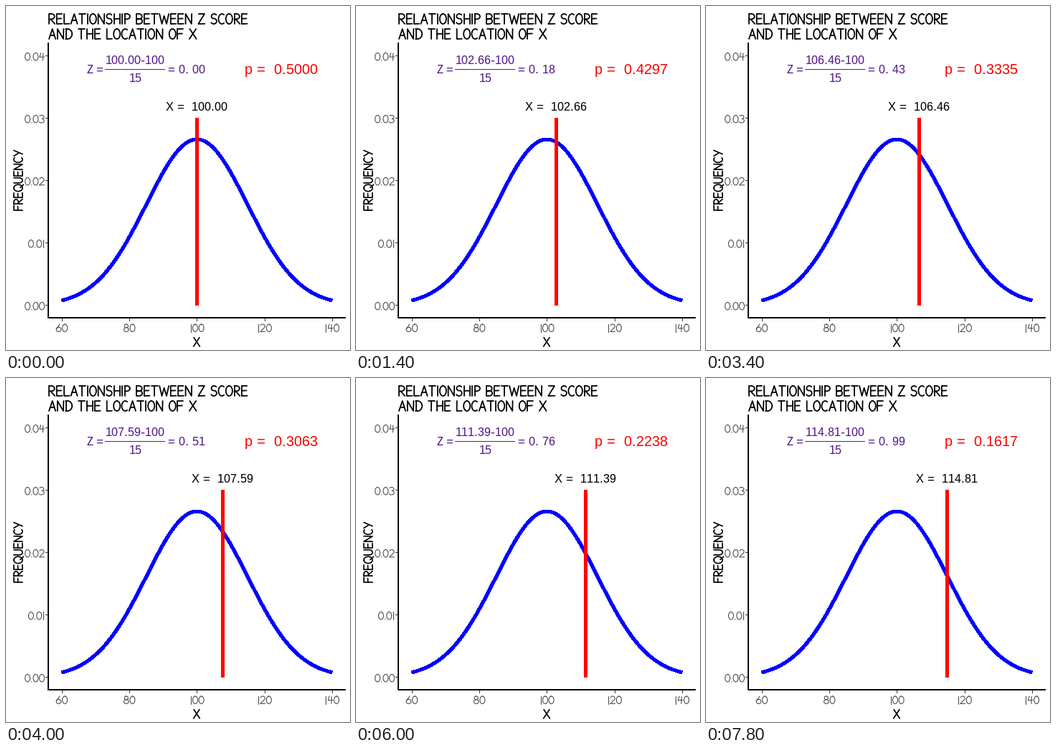
These frames come from a looping animation (480 by 480 pixels, 8000 ms). A matplotlib script:

```python
import math

import matplotlib.pyplot as plt
import numpy as np
from matplotlib.animation import FuncAnimation

SIZE, DPI = 480, 80
PT = 72 / DPI  # points per pixel
FRAMES, INTERVAL = 40, 200
MEAN, SD, STEP = 100, 15, 30 / 79

plt.rcParams.update({
    "font.family": "Liberation Sans",
    "text.hinting": "native",
    "text.hinting_factor": 1,
    "text.kerning_factor": 6,
})

fig = plt.figure(figsize=(SIZE / DPI, SIZE / DPI), dpi=DPI, facecolor="white")
ax = fig.add_axes([0, 0, 1, 1])
ax.set_xlim(0, SIZE)
ax.set_ylim(SIZE, 0)
ax.axis("off")


def px(x):
    return 266.4 + 4.714 * (x - MEAN)


def py(y):
    return 417.45 - 8700 * y


# Hand-lettered alphabet: strokes in a unit box, y pointing up.
def line(*xy):
    return np.array(xy, float).reshape(-1, 2)


def arc(cx, cy, rx, ry, start=90, end=450):
    t = np.radians(np.linspace(start, end, 30))
    return np.column_stack([cx + rx * np.cos(t), cy + ry * np.sin(t)])


def join(*parts):
    return np.vstack(parts)


STEM = line(0.05, 0, 0.05, 1)
RING = arc(0.5, 0.5, 0.5, 0.5)
BOWL = join(line(0.05, 1), arc(0.4, 0.74, 0.55, 0.26, 90, -90), line(0.05, 0.45))

LETTERS = {
    "A": [line(0, 0, 0.52, 1, 1, 0), line(0.2, 0.36, 0.82, 0.36)],
    "B": [STEM, BOWL, join(line(0.05, 0.5), arc(0.45, 0.26, 0.55, 0.26, 90, -90),
                           line(0.05, 0))],
    "C": [arc(0.6, 0.5, 0.6, 0.5, 55, 305)],
    "D": [STEM, join(line(0, 1), arc(0.3, 0.5, 0.7, 0.5, 90, -90), line(0, 0))],
    "E": [line(0.95, 1, 0.05, 1, 0.05, 0, 1, 0.02), line(0.05, 0.52, 0.85, 0.54)],
    "F": [line(1, 1, 0.05, 1, 0.05, 0), line(0.05, 0.52, 0.85, 0.54)],
    "H": [STEM, line(0.95, 0, 0.95, 1), line(0.05, 0.5, 0.95, 0.52)],
    "I": [line(0.5, 0, 0.5, 1)],
    "L": [line(0.05, 1, 0.05, 0, 1, 0.02)],
    "N": [line(0.05, 0, 0.05, 1, 0.92, 0, 0.95, 1)],
    "O": [RING],
    "P": [STEM, BOWL],
    "Q": [RING, line(0.55, 0.26, 1, -0.12)],
    "R": [STEM, BOWL, line(0.3, 0.47, 1, 0)],
    "S": [join(arc(0.52, 0.76, 0.46, 0.24, 35, 250),
               arc(0.46, 0.27, 0.5, 0.27, 75, -150))],
    "T": [line(0, 1, 1, 1), line(0.5, 1, 0.5, 0)],
    "U": [join(line(0.05, 1), arc(0.5, 0.38, 0.45, 0.38, 180, 360), line(0.95, 1))],
    "W": [line(0, 1, 0.26, 0, 0.5, 0.8, 0.76, 0, 1, 1)],
    "X": [line(0, 0, 0.95, 1), line(0.05, 1, 1, 0)],
    "Y": [line(0, 1, 0.5, 0.48), line(1, 1, 0.35, 0)],
    "Z": [line(0.05, 1, 0.95, 1, 0, 0, 1, 0.02)],
}
DIGITS = {
    "0": [RING],
    "1": [line(0.5, 1, 0.5, 0)],
    "2": [join(arc(0.48, 0.72, 0.45, 0.28, 160, -30), line(0, 0, 1, 0.02))],
    "3": [join(arc(0.42, 0.76, 0.48, 0.24, 140, -80),
               arc(0.42, 0.27, 0.55, 0.27, 80, -150))],
    "4": [line(0.3, 1, 0.05, 0.45, 1, 0.47), line(0.75, 0.95, 0.7, 0)],
    "6": [join(line(0.7, 1), arc(0.5, 0.3, 0.48, 0.3, 165, 525))],
    "8": [arc(0.5, 0.77, 0.38, 0.23), arc(0.5, 0.28, 0.48, 0.28)],
    ".": [line(0.4, 0, 0.6, 0.04)],
}
GLYPHS = {**LETTERS, **DIGITS, " ": []}
WIDTHS = {"W": 0.93, "Q": 0.78, "X": 0.7, "N": 0.68, "L": 0.54, "1": 0.2,
          "I": 0.1, ".": 0.1, " ": 0.3}
WIDTHS.update(dict.fromkeys("AHTDOUYZ", 0.65))
WIDTHS.update(dict.fromkeys("023468", 0.66))
GAP = 0.16


def width_of(text, h):
    return h * (sum(WIDTHS.get(c, 0.58) for c in text) + GAP * (len(text) - 1))


def letter(text, x, y, h, weight, color="black", align=0.0, upright=True):
    """Draw hand lettering with cap height h from the baseline point x, y."""
    pos = -align * width_of(text, h)
    for c in text:
        w = WIDTHS.get(c, 0.58) * h
        for stroke in GLYPHS[c]:
            along, up = pos + stroke[:, 0] * w, stroke[:, 1] * h
            xs, ys = (x + along, y - up) if upright else (x - up, y - along)
            ax.plot(xs, ys, color=color, lw=weight * PT, solid_capstyle="round",
                    solid_joinstyle="round")
        pos += w + GAP * h


def rule(xs, ys, color, weight, **kw):
    return ax.plot(xs, ys, color=color, lw=weight * PT, antialiased=False,
                   solid_capstyle="butt", **kw)[0]


def label(x, y, text, size, color):
    return ax.text(x, y, text, fontsize=size * PT, color=color,
                   ha="left", va="baseline", zorder=5)


# Titles and axes
letter("RELATIONSHIP BETWEEN Z SCORE", 60, 25, 14, 1.8)
letter("AND THE LOCATION OF X", 60, 46, 14, 1.8)
letter("FREQUENCY", 23, 285.5, 12.1, 1.7, upright=False)
letter("X", 266, 475, 12.4, 1.7, align=0.5)

rule([59, 59], [51, 436], "black", 2)
rule([58, 474], [435, 435], "black", 2)
GREY = "#4d4d4d"
for i in range(5):
    y = py(i / 100)
    rule([55, 58], [y, y], "#333333", 1)
    letter(f"{i / 100:.2f}", 53.5, y + 6.5, 10.5, 1.1, GREY, align=1)
    v = 60 + 20 * i
    rule([px(v)] * 2, [436, 439], "#333333", 1)
    letter(str(v), px(v), 454.5, 10.5, 1.1, GREY, align=0.5)

# Normal density
xs = np.linspace(60, 140, 200)
density = np.exp(-((xs - MEAN) / SD) ** 2 / 2) / (SD * math.sqrt(2 * math.pi))
rule(px(xs), py(density), "blue", 4, zorder=3)

# Formula and moving marker
PURPLE = "#551a8b"
label(113, 94, "Z", 17, PURPLE)
label(125, 94, "=", 17, PURPLE)
rule([138, 221], [88, 88], PURPLE, 1)
label(172, 106, "15", 17, PURPLE)
top = label(139, 81, "", 17, PURPLE)
score = label(226, 94, "", 17, PURPLE)
prob = label(333, 95, "", 20, "red")
where = label(223, 146, "", 17, "black")
marker = rule([0, 0], [156, 417], "red", 5, zorder=4)


def draw(i):
    x = MEAN + i * STEP
    z = (x - MEAN) / SD
    p = math.erfc(z / math.sqrt(2)) / 2
    top.set_text(f"{x:.2f}-{MEAN}")
    score.set_text("= " + f"{z:.2f}".replace(".", ". "))
    prob.set_text(f"p =  {p:.4f}")
    where.set_text(f"X =  {x:.2f}")
    where.set_x(round(px(x) - 43.3))
    marker.set_xdata([px(x)] * 2)
    return top, score, prob, where, marker


anim = FuncAnimation(fig, draw, frames=FRAMES, interval=INTERVAL,
                     repeat=True, repeat_delay=0, blit=False)
plt.show()
```
